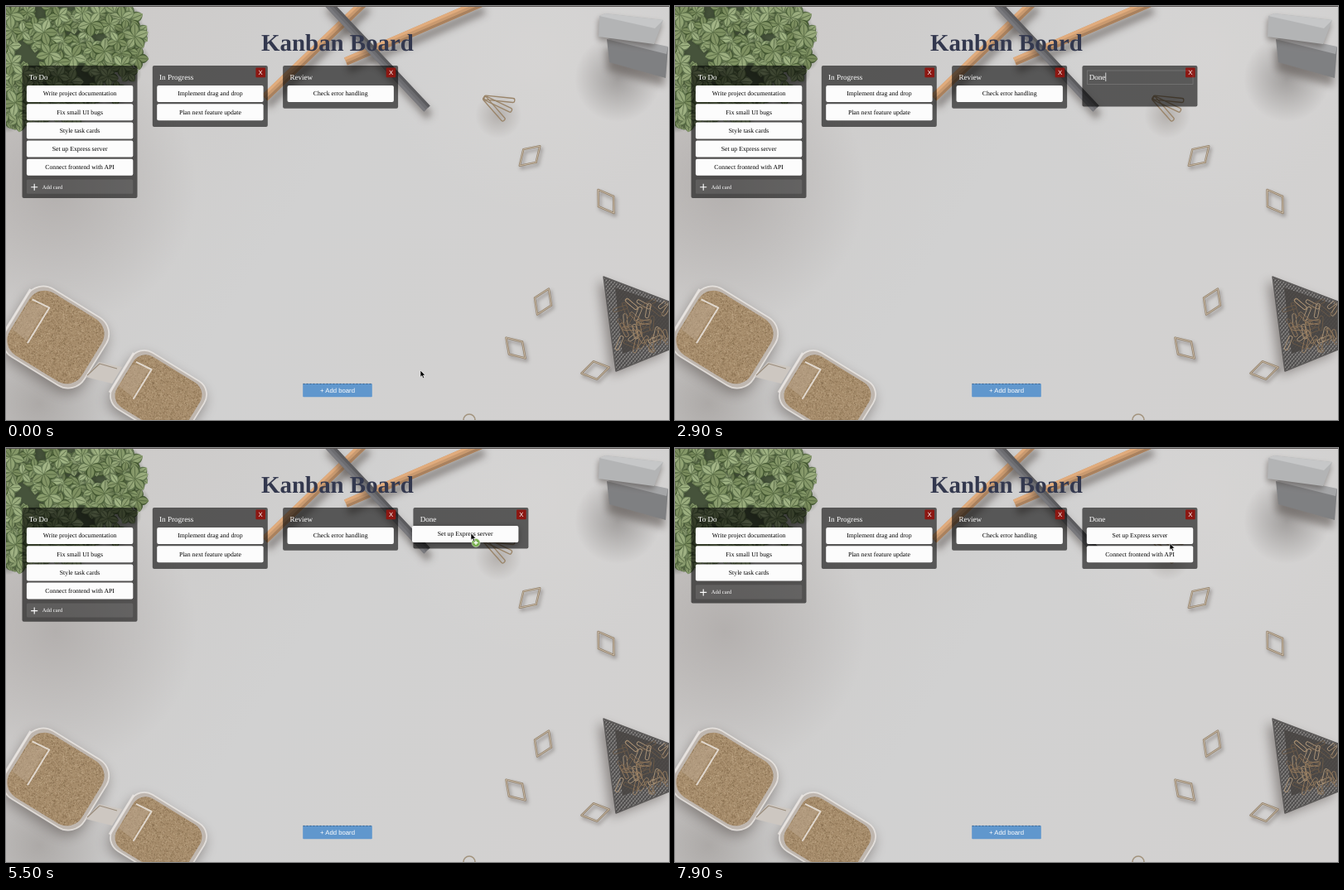
An HTML page with a canvas that plays this animation: 800 by 500 pixels, repeating every 8000 ms.

```html
<!DOCTYPE html>
<html lang="en">
<head>
<meta charset="utf-8">
<title>Kanban Board</title>
<style>
  html, body { margin: 0; width: 100%; height: 100%; overflow: hidden; background: #d1d1d1; }
  canvas, svg { position: absolute; left: 0; top: 0; width: 800px; height: 500px; }
  text { font-family: "Liberation Serif", "Times New Roman", serif; font-size: 7.74px; fill: #fff; text-rendering: geometricPrecision; }
  .title { font-size: 28.9px; font-weight: bold; fill: #33384e; }
  .head { font-size: 9.1px; }
  .small { font-size: 6.65px; }
  .sans { font-family: "Liberation Sans", Arial, sans-serif; }
  .ink { fill: #000; }
  .mid { text-anchor: middle; }
  .lift { filter: drop-shadow(0 2px 3px rgba(0,0,0,.35)); }
</style>
</head>
<body>
<canvas id="desk" width="800" height="500"></canvas>
<svg id="ui" viewBox="0 0 800 500"></svg>
<script>
// ---------- Desk backdrop ----------
const c = document.getElementById('desk').getContext('2d');
const TAU = Math.PI * 2;
let seed = 11;
const rnd = (a, b) => {
  seed = (seed * 16807) % 2147483647;
  return a + (b - a) * seed / 2147483647;
};

function trace(pts, closed = true) {
  c.beginPath();
  for (let i = 0; i < pts.length; i += 2) c.lineTo(pts[i], pts[i + 1]);
  if (closed) c.closePath();
}
function poly(pts, fill) { trace(pts); c.fillStyle = fill; c.fill(); }
function line(pts, color, width, closed = false) {
  trace(pts, closed);
  c.strokeStyle = color; c.lineWidth = width; c.stroke();
}
// Draws in a turned local frame
function at(x, y, turn, draw) {
  c.save();
  c.translate(x, y); c.rotate(turn);
  draw();
  c.restore();
}
function shadow(blur, x, y, draw) {
  c.save();
  c.shadowColor = 'rgba(70,62,58,.5)';
  c.shadowBlur = blur; c.shadowOffsetX = x; c.shadowOffsetY = y;
  draw();
  c.restore();
}
function glow(x, y, r, rgb, a) {
  const g = c.createRadialGradient(x, y, 0, x, y, r);
  g.addColorStop(0, `rgba(${rgb},${a})`);
  g.addColorStop(1, `rgba(${rgb},0)`);
  c.fillStyle = g;
  c.fillRect(x - r, y - r, r * 2, r * 2);
}

function leaf(r, tone) {
  const shape = k => {
    c.beginPath();
    c.moveTo(0, 0);
    c.quadraticCurveTo(r * .55, -r * .75 * k, r, 0);
    c.quadraticCurveTo(r * .55, r * .75 * k, 0, 0);
    c.fill();
  };
  c.fillStyle = `rgb(${84 + tone},${104 + tone},${66 + tone})`;
  shape(1);
  c.fillStyle = `rgba(${160 + tone},${178 + tone},${128 + tone},.75)`;
  shape(.72);
  line([0, 0, r * .9, 0], 'rgba(70,88,54,.6)', 1);
}
function plant() {
  c.fillStyle = '#46533b';
  c.beginPath(); c.ellipse(0, 0, 150, 142, 0, 0, TAU); c.fill();
  c.fillRect(0, 0, 152, 62);
  for (let n = 0; n < 150; n++) {
    const x = rnd(0, 158), y = rnd(0, 148);
    if ((x / 162) ** 3 + (y / 150) ** 3 > 1) continue;
    glow(x, y, 16, '40,50,32', .55);
    const spin = rnd(0, TAU), r = rnd(11, 18);
    for (let k = 0; k < 5; k++) at(x, y, spin + k * TAU / 5, () => leaf(r, rnd(-22, 22)));
  }
}

function pencil(x1, y1, x2, y2, w, rgb) {
  const shade = k => `rgb(${rgb.map(v => v * k)})`;
  const length = Math.hypot(x2 - x1, y2 - y1);
  at(x1, y1, Math.atan2(y2 - y1, x2 - x1), () => {
    shadow(9, 3, 9, () => line([0, 0, length, 0], shade(1), w));
    line([0, w / 3, length, w / 3], shade(1.12), w / 3);
    line([0, -w / 3, length, -w / 3], shade(.84), w / 3);
  });
}

function clip(x, y, degrees) {
  const rhombus = [-17, 0, 0, -11, 17, 0, 0, 11];
  c.lineJoin = 'round';
  at(x, y, degrees * TAU / 360, () => {
    shadow(4, 2, 3, () => line(rhombus, '#938069', 2.4, true));
    line(rhombus, '#cfc3b1', .8, true);
  });
}

// Rounded glass bulb, part filled with sand; local x runs towards the neck
function bulb(x, y, turn, w, h, grains) {
  const body = (a, b) => { c.beginPath(); c.roundRect(-a, -b, a * 2, b * 2, b * .48); };
  at(x, y, turn, () => {
    shadow(16, -2, 6, () => { body(w, h); c.fillStyle = '#bfb7b0'; c.fill(); });
    c.strokeStyle = 'rgba(238,234,230,.8)'; c.lineWidth = 1.8; c.stroke();
    c.save();
    body(w - 5, h - 4);
    c.fillStyle = '#a68c6b'; c.fill(); c.clip();
    for (let i = 0; i < grains; i++) {
      c.fillStyle = i % 2 ? 'rgba(120,96,66,.5)' : 'rgba(200,178,146,.5)';
      c.fillRect(rnd(-w, w), rnd(-h, h), 1, 1);
    }
    c.restore();
    poly([-w + 6, -h * .4, -w * .5, -h * .55, -w * .5, h * .45, -w + 6, h * .4], 'rgba(190,172,150,.45)');
    line([-w + 8, -h * .5, -w * .45, -h * .55, -w * .45, h * .5], 'rgba(236,230,224,.85)', 2);
    line([-w, -h * .7, -w, h * .7], 'rgba(232,228,224,.9)', 3);
  });
}
function hourglass() {
  bulb(60, 400, .55, 56, 48, 4500);
  bulb(184, 470, .55, 52, 40, 3000);
  poly([96, 448, 112, 430, 140, 436, 128, 456], '#cdc7c1');
  line([98, 446, 113, 432, 134, 438], '#9b8d7c', 1.2);
}

function basket() {
  const outline = [721, 327, 800, 357, 800, 415, 736, 441];
  shadow(14, -6, 5, () => poly(outline, '#6c6a69'));
  c.save();
  trace(outline); c.clip();
  for (let k = -30; k < 60; k++) {
    const y = 320 + k * 5;
    line([715, y, 805, y + 110], '#a3a09e', .8);
    line([715, y, 805, y - 110], '#484646', 1.2);
  }
  poly([735, 340, 800, 362, 800, 400, 744, 420], 'rgba(72,69,67,.88)');
  for (let i = 0; i < 40; i++) {
    at(rnd(740, 798), rnd(358, 412), rnd(0, TAU), () => {
      c.beginPath(); c.roundRect(-9, -2.2, 18, 4.4, 2.2);
      c.strokeStyle = ['#92795d', '#ab9478', '#6c5a48'][i % 3];
      c.lineWidth = .9; c.stroke();
    });
  }
  c.restore();
  line(outline, '#5b5958', 1.5, true);
}

function blocks() {
  glow(738, 88, 52, '110,106,104', .5);
  shadow(10, -2, 10, () => poly([725, 40, 799, 50, 796, 87, 728, 68], '#7f8082'));
  poly([725, 40, 738, 36, 799, 49, 797, 58], '#a4a5a7');
  shadow(7, -1, 4, () => poly([716, 12, 723, 9, 793, 17, 782, 46, 715, 37], '#b3b4b5'));
  poly([716, 12, 723, 9, 793, 17, 783, 27], '#c6c7c8');
}

function binder() {
  glow(594, 132, 28, '130,122,116', .4);
  for (const turn of [.1, .45, .85]) {
    at(577, 110, turn, () => {
      c.beginPath(); c.roundRect(0, -2, 37, 5, 2);
      c.strokeStyle = '#9a856a'; c.lineWidth = 1.3; c.stroke();
    });
  }
}

function paintDesk() {
  const g = c.createLinearGradient(0, 0, 800, 500);
  g.addColorStop(0, '#cbc8c6'); g.addColorStop(.45, '#d1d1d1'); g.addColorStop(1, '#d3d1d0');
  c.fillStyle = g; c.fillRect(0, 0, 800, 500);
  glow(640, 60, 190, '222,219,217', .35);
  glow(60, 220, 170, '140,134,132', .4);
  glow(40, 480, 110, '130,124,120', .45);
  plant();
  pencil(434, -6, 312, 111, 10, [201, 154, 112]);
  pencil(574, -4, 410, 67, 10, [201, 154, 112]);
  pencil(386, -6, 508, 124, 10, [108, 108, 112]);
  blocks();
  binder();
  clip(632, 181, -44);
  clip(724, 236, 56);
  clip(648, 357, -66);
  clip(615, 413, 47);
  basket();
  clip(711, 440, -12);
  c.beginPath(); c.arc(559, 500, 7, 0, TAU);
  c.strokeStyle = '#a3947e'; c.lineWidth = 1.6; c.stroke();
  hourglass();
  c.fillStyle = '#55504f'; c.fillRect(0, 0, 800, 1);
}

// ---------- Board ----------
const LOOP = 8000, STEP = 100, PITCH = 22.2;
const ADDED = 900, TYPING = 1900, KEY = 200, ENTERED = 3300;

const colX = i => 19.5 + 157.3 * i;
const slot = (i, k) => [colX(i) + 5.4, 96 + PITCH * k];
const rect = (x, y, w, h, fill, r = 0, more = '') =>
  `<rect x="${x}" y="${y}" width="${w}" height="${h}" rx="${r}" fill="${fill}" ${more}/>`;
const text = (x, y, s, cls = '') => `<text x="${x}" y="${y}" class="${cls}">${s}</text>`;
const card = ([x, y], s) => rect(x, y, 128.4, 20, '#fcfcfc', 2) + text(x + 64.2, y + 12.4, s, 'ink mid');

function column(i, name, cards) {
  const x = colX(i), end = 96 + PITCH * cards.length, first = !i;
  const bottom = first ? end + 25 : Math.max(121.5, end + 5.6);
  let s = rect(x, 72, 139, bottom - 72, 'rgba(0,0,0,.58)', 2) + text(x + 8.3, 88.8, name, 'head');
  s += cards.map((label, k) => card(slot(i, k), label)).join('');
  if (first) {
    const y = end + 2.6;
    s += rect(x + 5.4, y, 128.4, 17.2, 'rgba(255,255,255,.1)', 1.5) + text(x + 24.2, y + 10.9, 'Add card', 'small')
      + `<path d="M${x + 10.7} ${y + 9.2}h8m-4-4v8" stroke="#fff" stroke-width="1.1"/>`;
  } else {
    s += rect(x + 124.6, 74.6, 11.6, 11.6, '#8c1712', 1) + text(x + 130.4, 83.4, 'X', 'sans mid');
  }
  return s;
}

function nameField(typed) {
  c.font = '9.1px "Liberation Serif", serif';
  const x = colX(3) + 8.3 + c.measureText(typed).width;
  return rect(497.5, 78, 127.5, 16.5, 'none', 0, 'stroke="rgba(255,255,255,.2)" stroke-width=".7"')
    + rect(x, 80.5, .8, 10.5, '#eee');
}

const ARROW = '<path d="M0 0v8.2l1.9-1.7 1.3 3 1.5-.6-1.3-2.9h2.5z" fill="#000" stroke="#fff" stroke-width=".6"/>';
const HAND = '<path d="M-1.2-4.5c0-1.2 1.6-1.2 1.6 0v2.6l3.3.7c.9.3 1 .9.9 1.7l-.6 3.3h-4.6l-2.6-3.2c-.7-1 .5-1.7 1.2-1l.8.8z" fill="#fff" stroke="#000" stroke-width=".8"/>';
const PLUS = '<g transform="translate(6 11.5)"><circle r="5" fill="#78b04e" stroke="#dfe8d8" stroke-width=".6"/><path d="M-2.6 0h5.2M0-2.6v5.2" stroke="#fff" stroke-width="1.3"/></g>';

// Stops: time, x, y
const POINTER = [[0, 500, 440], [500, 410, 464], [900, 405, 464], [1700, 545, 91], [3400, 545, 91],
  [4600, 107, 190], [4900, 96, 172], [5500, 561, 103], [5700, 565, 104],
  [6600, 96, 172], [6900, 289, 174], [7500, 595, 122], [7900, 597, 115]];
const DRAGS = [
  { label: 'Set up Express server', path: [[4900, ...slot(0, 3)], [5500, 490, 94], [5700, ...slot(3, 0)]] },
  { label: 'Connect frontend with API', path: [[6600, ...slot(0, 3)], [6900, 140, 163], [7600, ...slot(3, 1)]] }
];

function along(path, t) {
  const i = path.findIndex(p => p[0] > t);
  if (i < 0) return path[path.length - 1].slice(1);
  if (!i) return path[0].slice(1);
  const [a, b] = [path[i - 1], path[i]], k = (t - a[0]) / (b[0] - a[0]);
  const ease = k * k * (3 - 2 * k);
  return [1, 2].map(n => a[n] + (b[n] - a[n]) * ease);
}

function pointer(t, holding, todoCount) {
  const [x, y] = along(POINTER, t);
  const inside = (left, top, w, h) => x >= left && x <= left + w && y >= top && y <= top + h;
  const hover = inside(358, 456, 84, 16) || inside(25, 96, 128, PITCH * todoCount)
    || (t >= ADDED && t < ENTERED + KEY && inside(497, 78, 128, 17));
  const plus = holding && x > colX(3) ? PLUS : '';
  return `<g transform="translate(${x} ${y})">${plus}${hover && !holding ? HAND : ARROW}</g>`;
}

function scene(t) {
  const todo = ['Write project documentation', 'Fix small UI bugs', 'Style task cards'];
  const done = [];
  let held = '';
  for (const { label, path } of DRAGS) {
    if (t < path[0][0]) todo.push(label);
    else if (t >= path[path.length - 1][0]) done.push(label);
    else held = `<g class="lift">${card(along(path, t), label)}</g>`;
  }
  let s = text(400, 54, 'Kanban Board', 'title mid')
    + column(0, 'To Do', todo)
    + column(1, 'In Progress', ['Implement drag and drop', 'Plan next feature update'])
    + column(2, 'Review', ['Check error handling']);
  if (t >= ADDED) {
    const typed = 'Done'.slice(0, Math.max(0, Math.floor((t - TYPING) / KEY)));
    s += column(3, typed, done);
    if (t < ENTERED) s += nameField(typed);
  }
  s += rect(358.2, 456, 83.6, 16.2, '#6097cd', 1)
    + '<path d="M358.5 456.4h83" stroke="#35577a" stroke-width=".8" stroke-dasharray="2 2"/>'
    + text(400, 466.7, '+ Add board', 'sans mid') + held;
  const hidden = t > TYPING && t <= ENTERED;
  return hidden ? s : s + pointer(t, held !== '', todo.length);
}

const ui = document.getElementById('ui');
const start = performance.now();
let shown = -1;
function frame() {
  const t = Math.floor((performance.now() - start) % LOOP / STEP) * STEP;
  if (t !== shown) ui.innerHTML = scene(shown = t);
  requestAnimationFrame(frame);
}
paintDesk();
frame();
</script>
</body>
</html>
```
